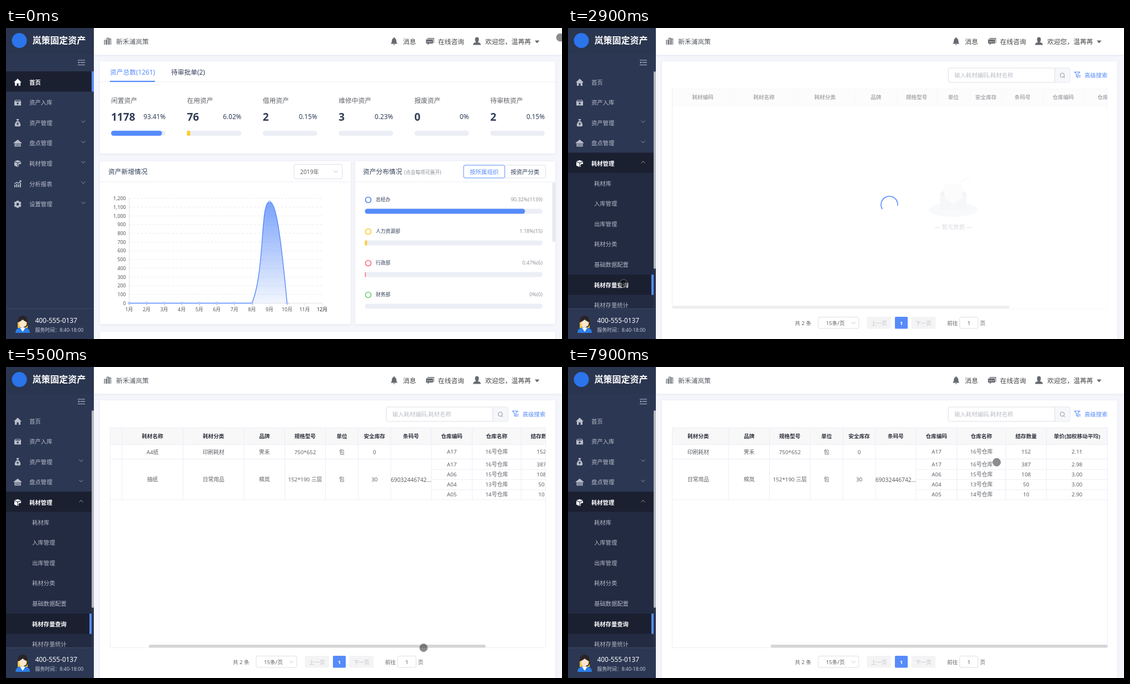
Animation, 1000 px wide and 560 px high, one loop 8000 ms. Source, as an HTML page:

```html
<!DOCTYPE html>
<html lang="zh-CN">
<head>
<meta charset="utf-8">
<title>固定资产</title>
<style>
html, body { margin: 0; width: 100%; height: 100%; overflow: hidden; background: #f5f6fb; }
svg { display: block; width: 1000px; height: 560px; }
text { font-family: "Noto Sans", "Noto Sans CJK SC", sans-serif; white-space: pre; }
</style>
</head>
<body>
<svg id="stage" viewBox="0 0 1000 560">
  <defs>
    <linearGradient id="area" x1="0" y1="0" x2="0" y2="1">
      <stop offset="0" stop-color="#5a8cfa" stop-opacity=".8"/>
      <stop offset="1" stop-color="#5a8cfa" stop-opacity=".08"/>
    </linearGradient>
    <filter id="soft" x="-5%" y="-10%" width="110%" height="125%">
      <feDropShadow dx="0" dy="1" stdDeviation="2" flood-color="#28395f" flood-opacity=".07"/>
    </filter>
    <clipPath id="tableBox"><rect x="187.5" y="109" width="783" height="397"/></clipPath>
    <clipPath id="menuBox"><rect y="78" width="158" height="427"/></clipPath>
  </defs>
  <g id="dash"></g>
  <g id="stock"></g>
  <g id="top"></g>
  <g id="side"></g>
  <circle id="cursor" r="7" fill="#000" fill-opacity=".45" stroke="#828282" stroke-opacity=".85"/>
</svg>
<script>
const LOOP = 8000, STEP = 100;
const BLUE = '#568bfa', YELLOW = '#fdcb2e', RED = '#fb6f7f', GREEN = '#72cd7c';
const INK = '#303d57', GREY = '#606266', PALE = '#ebeef5', EDGE = '#dcdfe6';
const NAVY = '#2c3753', DEEP = '#232b43', NIGHT = '#1b2031';
const $ = id => document.getElementById(id);

// y is the middle of the line of text
const text = (x, y, s, size, fill = INK, anchor = 'start', weight = 400) =>
  `<text x="${x}" y="${y + size * .37}" font-size="${size}" fill="${fill}" text-anchor="${anchor}" font-weight="${weight}">${s}</text>`;
const mid = (x, y, s, size, fill, weight) => text(x, y, s, size, fill, 'middle', weight);
const end = (x, y, s, size, fill, weight) => text(x, y, s, size, fill, 'end', weight);
const rect = (x, y, w, h, fill, r = 0, more = '') =>
  `<rect x="${x}" y="${y}" width="${w}" height="${h}" rx="${r}" fill="${fill}" ${more}/>`;
const box = (x, y, w, h, stroke = EDGE, fill = '#fff', r = 3) =>
  rect(x + .5, y + .5, w - 1, h - 1, fill, r, `stroke="${stroke}"`);
const card = (x, y, w, h) => rect(x, y, w, h, '#fff', 2, 'filter="url(#soft)"');
const line = (d, stroke, w = 1, more = '') => `<path d="${d}" fill="none" stroke="${stroke}" stroke-width="${w}" ${more}/>`;
const fill = (d, color) => `<path d="${d}" fill="${color}" fill-rule="evenodd"/>`;
const at = (x, y, s, turn = 0) => `<g transform="translate(${x} ${y}) rotate(${turn})">${s}</g>`;
const chevron = (x, y, color, turn = 0) => at(x, y, line('M-3.5-1.8 0 1.8 3.5-1.8', color), turn);
const bar = (x, y, w, part, color) => rect(x, y, w, 9, PALE, 4.5) +
  (part ? rect(x, y, part, 9, color, Math.min(4.5, part / 3)) : '');

// value at t along rows of [time, ...values]
function along(keys, t) {
  if (t <= keys[0][0]) return keys[0].slice(1);
  for (let i = 1; i < keys.length; i++) {
    const a = keys[i - 1], b = keys[i];
    if (t <= b[0]) {
      const k = (t - a[0]) / (b[0] - a[0]);
      return a.slice(1).map((v, j) => v + (b[j + 1] - v) * k);
    }
  }
  return keys[keys.length - 1].slice(1);
}

const pointer = [
  [0, 997, 17], [200, 559, 71], [300, 275, 125], [400, 8, 156], [500, 8, 164], [600, 20, 180],
  [1100, 80, 246], [1500, 82, 252], [1800, 92, 390], [2100, 94, 485], [2400, 100, 460],
  [3000, 100, 460], [3200, 170, 380], [3350, 330, 210], [3500, 530, 135], [3600, 782, 144],
  [3800, 842, 120], [4000, 849, 115], [4200, 849, 115], [4400, 874, 150], [4700, 708, 422],
  [4800, 668, 466], [4900, 655, 486], [5100, 683, 505], [5200, 683, 505], [5500, 751, 505.5],
  [5900, 792.5, 505.5], [6200, 845, 506], [6600, 860, 507], [6900, 860, 507], [7000, 857, 475],
  [7100, 864, 378], [7300, 917, 160], [7400, 880, 123], [7600, 712, 143], [7700, 696, 152],
  [7800, 733, 158], [7900, 771, 171.5]
];
const scroll = [[5200, 0], [5500, 89], [5900, 161], [6100, 220], [6200, 228]];
const unfold = [[1200, 0], [1300, .12], [1400, .55], [1500, .87], [1600, 1]];

function dashboard() {
  let s = card(169, 60, 819, 166) + card(169, 240, 451, 293) + card(628, 240, 360, 293) + card(169, 547, 819, 30);
  s += text(187, 79.5, '资产总数(1261)', 11.75, BLUE) + text(297, 79.5, '待审批单(2)', 11.75);
  s += line('M169 97H988M169 277H620M628 277H988', PALE) + rect(187, 95, 81, 2.2, BLUE);

  const stats = [['闲置资产', 1178, '93.41%', 91.5, BLUE], ['在用资产', 76, '6.02%', 6, YELLOW], ['借用资产', 2, '0.15%'],
    ['维修中资产', 3, '0.23%'], ['报废资产', 0, '0%'], ['待审核资产', 2, '0.15%']];
  stats.forEach(([name, n, pct, part, color], i) => {
    const x = 189 + 136.4 * i;
    s += text(x, 130.5, name, 11.75, GREY) + text(x, 159.5, n, 19, INK, 'start', 700) +
      end(x + 98, 159.5, pct, 11.75, INK) + bar(x, 185, 98, part, color);
  });

  s += text(184, 259, '资产新增情况', 11.75) + box(517.5, 245, 88, 27) +
    text(529, 259, '2019年', 10.3, GREY) + chevron(593, 258.5, '#b8bcc6');
  for (let i = 0; i <= 12; i++) {
    const y = 495.5 - 15.72 * i;
    s += end(215.5, y, (i * 100).toLocaleString('en-US'), 8.8, '#555');
    if (i) s += line(`M221.5 ${y}H569`, '#e6e6e8', .8, 'stroke-dasharray="4 3"');
  }
  const mx = i => 221.3 + 31.58 * i;
  s += line('M221.5 307V495.5H569', '#dfe2e8');
  for (let i = 0; i < 12; i++)
    s += line(`M${mx(i)} 495.5v4`, '#d5d8de', .8) + mid(mx(i), 507, i + 1 + '月', 8.8, i == 11 ? '#222' : '#555');
  const hill = 'C466 437 457 313 474 313C484 313 492 350 505.5 495.5';
  s += fill(`M442.4 495.5${hill}Z`, 'url(#area)') + line(`M221.3 495.5H442.4${hill}`, BLUE, 1.4);
  for (let i = 0; i < 10; i++)
    s += `<circle cx="${mx(i)}" cy="${i == 8 ? 313 : 495.5}" r="1.6" fill="#fff" stroke="${BLUE}"/>`;

  s += text(642, 259, '资产分布情况', 11.75) + text(716, 260, '(点击每项可展开)', 8.8, '#8a8d94');
  s += box(896, 246.5, 75, 24) + box(822.5, 246.5, 75, 24, BLUE);
  s += mid(860, 259, '按所属组织', 10.3, BLUE) + mid(933.5, 259, '按资产分类', 10.3, INK);
  s += rect(982.5, 278, 5.5, 107, '#e6e8ed', 2);
  [['总经办', '90.32%(1139)', 288, BLUE], ['人力资源部', '1.18%(15)', 3.8, YELLOW],
    ['行政部', '0.47%(6)', 1.6, RED], ['财务部', '0%(0)', 0, GREEN]].forEach(([name, pct, part, color], i) => {
    const y = 309.5 + 57 * i;
    s += `<circle cx="651.5" cy="${y}" r="5" fill="#fff" stroke="${color}" stroke-width="1.7"/>` +
      text(665, y - .5, name, 8.8) + end(965, y - .5, pct, 9.1, '#8f9299') + bar(645.5, y + 16, 319.5, part, color);
  });
  return s;
}

const cols = [187.5, 297.5, 407.5, 517, 590.5, 663.5, 722.5, 781, 854, 927.5, 1015.5, 1088.5, 1198.5];
const heads = ['耗材编码', '耗材名称', '耗材分类', '品牌', '规格型号', '单位', '安全库存', '条码号', '仓库编码', '仓库名称', '结存数量', '单价(加权移动平均)'];
const goods = [['4HBE6M8CSJ', 'A4纸', '印刷耗材', '霁禾', '750*652', '包', '0', ''],
  ['W1FFBVKQF4', '抽纸', '日常用品', '棉岚', '152*190 三层', '包', '30', '69032446742...']];
const lots = [['A17', '16号仓库', '152', '2.11'], ['A17', '16号仓库', '387', '2.98'], ['A06', '15号仓库', '108', '3.00'],
  ['A04', '13号仓库', '50', '3.00'], ['A05', '14号仓库', '10', '2.90']];
const center = i => (cols[i] + cols[i + 1]) / 2;

function emptyNote() {
  return at(693, 310, '<ellipse cy="17" rx="44" ry="13" fill="#eef0f4"/>' +
    fill('M-24-12 0-28 24-12V17H-24Z', '#dfe3ea') + fill('M-16-30H16V0L0 10-16 0Z', '#f8f9fb') +
    fill('M-24-12 0 8 24-12V17H-24Z', '#e8ebf0') + line('M14-32Q22-44 30-38', '#dfe3ea')) +
    mid(693, 358, '— 暂无数据 —', 10.3, '#a5a9b2');
}

function stockPage(t) {
  const loaded = t >= 3300, shift = along(scroll, t)[0], rowEnd = loaded ? 239 : 139;
  let s = card(169, 60, 819, 520);
  s += box(683.5, 71.5, 220, 27) + rect(876, 72.5, 26.5, 25, '#f5f7fa') + line('M875.5 72V98', EDGE);
  s += text(695, 85, '输入耗材编码,耗材名称', 10.3, '#b9bdc7');
  s += '<circle cx="889" cy="85" r="3.8" fill="none" stroke="#909399"/>' + line('M891.6 87.8 893.6 90', '#909399');
  s += line('M911 79.2H920.5L917 83.5V89L914.4 87.5V83.5ZM918.5 85.5H922M918.5 88H922', BLUE, 1.1) +
    text(929, 85, '高级搜索', 10.3, BLUE);

  let body = rect(187.5, 109, 1011, 30, '#f8f8f9') + line('M187 109.5H1199M187 139.5H1199', PALE);
  heads.forEach((h, i) => { body += mid(center(i), 124.5, h, 9.65, '#30343c', 700); });
  body += line(cols.slice(1).map(x => `M${x} 109V${rowEnd}`).join(''), PALE);
  if (loaded) {
    body += line('M187 165.5H1199M187 239H1199M854 184.3H1199M854 202.5H1199M854 220.8H1199', PALE);
    goods.forEach((row, r) => row.forEach((v, i) => {
      body += mid(center(i), r ? 202.7 : 153, v, i % 7 ? 9.8 : 10.3, i ? GREY : BLUE);
    }));
    lots.forEach((row, r) => row.forEach((v, i) => {
      body += mid(center(i + 8), r ? 156.8 + 18.25 * r : 152.5, v, 9.8, GREY);
    }));
  } else body += emptyNote();
  s += `<g clip-path="url(#tableBox)"><g transform="translate(${-shift})">${body}</g></g>`;
  s += line('M187.5 109V505.5H970.5V109', PALE) + rect(188 + shift * 606 / 783, 500, 606, 5.2, '#d6d6d7', 2.6);

  if (!loaded) s += rect(188, 109, 783, 397, '#fff', 0, 'opacity=".6"') +
    at(578, 318, `<circle r="15" fill="none" stroke="${BLUE}" stroke-width="1.6" stroke-dasharray="56 39" stroke-linecap="round"/>`, t * .3);

  s += text(408, 531, '共 2 条', 9.6, GREY) + box(449.5, 520, 74, 21.5) + text(464, 531, '15条/页', 9.6, GREY) + chevron(513.5, 531, '#c0c4cc');
  s += rect(537.5, 520, 43.5, 21.5, '#f4f4f5', 1.5) + mid(559.3, 531, '上一页', 9.6, '#c0c4cc');
  s += rect(588, 520, 23, 21.5, BLUE, 1.5) + mid(599.5, 531, '1', 9.6, '#fff', 700);
  s += rect(617.5, 520, 43.5, 21.5, '#f4f4f5', 1.5) + mid(639.3, 531, '下一页', 9.6, '#c0c4cc');
  s += text(682, 531, '前往', 9.6, GREY) + box(704, 520, 34, 21.5) + mid(721, 531, '1', 9.6, GREY) + text(741, 531, '页', 9.6, GREY);
  return s;
}

function topBar() {
  const c = '#666a70';
  return rect(158, 0, 842, 48, '#fff', 0, 'filter="url(#soft)"') +
    at(183, 24, line('M-6 6V-2H-2.5V6M-1.5 6V-6H2V6M3 6V-4.5H5.5V6', c, 1.2) + line('M-4.2-1V6M.3-5V6', c, .7)) +
    text(198, 24.5, '新禾浦岚策', 11.75, '#51565e') +
    at(698, 24, fill('M-6 4.5Q-4 3-4-1Q-4-5-1-5.5V-7H1V-5.5Q4-5 4-1Q4 3 6 4.5ZM-2 5.5H2Q0 8-2 5.5Z', c)) +
    text(714, 24.5, '消息', 11.75, '#444') +
    at(763, 24, fill('M-5-6H7V3H6V-4.5H-5ZM-7.5-3.5H5V4H-2L-4.5 7V4H-7.5ZM-5 0v1.5h1.5V0ZM-2 0v1.5h1.5V0ZM1 0v1.5h1.5V0Z', c)) +
    text(777, 24.5, '在线咨询', 11.75, '#444') +
    at(847, 24, fill('M-3.5-3.5A3.5 4 0 0 1 3.5-3.5Q3.5 0 1.5 1.5Q7 2.5 7 6.5H-7Q-7 2.5-1.5 1.5Q-3.5 0-3.5-3.5Z', c)) +
    text(862, 24.5, '欢迎您，温苒苒', 11.75, '#444') + fill('M951 22.5H959.5L955.2 27.5Z', c);
}

const icons = [
  'M-7 .3 0-6.5 7 .3H5V6.3H1.6V2h-3.2V6.3H-5V.3Z',
  'M-4-5H4L6-2.5V5H-6V-2.5ZM-4.5-2.2H4.5L3.4-3.8H-3.4ZM-.7-.5V.8H-2V2H-.7V3.3H.7V2H2V.8H.7V-.5Z',
  'M-2.5-7H2.5L1.2-4H-1.2ZM-1.5-3.3H1.5C5-1 7 6.3 3 6.3H-3C-7 6.3-5-1-1.5-3.3ZM-2-.8-.6 1.2H-2V2.2H-.5V4.5H.5V2.2H2V1.2H.6L2-.8H1L0 .7-1-.8Z',
  'M-7-1 0-6.5 7-1V.2H-7ZM-5.5 1H5.5V6H-5.5ZM-3.5 2V5H-2.2V2ZM-.7 2V5H.7V2ZM2.2 2V5H3.5V2Z',
  'M-6-4 0-6.3 6-4 0-1.7ZM-6-3V3.5L-.5 6V-.8ZM6-3 .5-.8V6L2 5.3A3 3 0 0 1 6 1Z',
  'M-6 2H-4V6H-6ZM-2.7 0H-.7V6H-2.7ZM.7 1H2.7V6H.7ZM4-2H6V6H4ZM-6.5 0-2-4 1-2 4.5-5H3V-6.2H6.5V-3H5.4V-4L1-.2-2-2.3-6 1Z',
  'M-2-6.3H2L2.6-4.4 5-5 6.5-1.8 5 0 6.5 2 5 5 2.6 4.4 2 6.3H-2L-2.6 4.4-5 5-6.5 2-5 0-6.5-1.8-5-5-2.6-4.4ZM0-2.3A2.3 2.3 0 1 0 0 2.3 2.3 2.3 0 1 0 0-2.3Z'
];
const menu = ['首页', '资产入库', '资产管理', '盘点管理', '耗材管理', '分析报表', '设置管理'];
const submenu = ['耗材库', '入库管理', '出库管理', '耗材分类', '基础数据配置', '耗材存量查询', '耗材存量统计'];
const ROW = 36.6, TOP = 78, VIEW = 427, FULL = ROW * 7;

// y is the top edge of the row
function menuItem(i, y, right, active, dark, turn) {
  const c = active ? '#fff' : '#b9bfcb', cy = y + 19.8;
  return (dark ? rect(0, y, right, ROW, NIGHT) : '') + at(21, cy, fill(icons[i], c)) +
    text(42, cy, menu[i], 10.3, c, 'start', active ? 700 : 400) +
    (i > 1 ? chevron(right - 19, cy - 2.5, '#9098aa', turn) : '');
}

function agent() {
  return at(30, 534,
    fill('M-9-6Q-8-14 0-14Q8-14 9-6L9 6H-9Z', '#f2c244') +
    fill('M-13 15Q-13 7-4 5H4Q13 7 13 15Z', '#2b7ee8') + fill('M-5 5.5H5L0 13Z', '#fff') +
    '<ellipse cy="-2" rx="6.3" ry="7.8" fill="#fbe6d0"/>' +
    fill('M-9-4C-11-20 11-20 9-4L6-5Q2-7 0-9Q-2-7-6-5Z', '#2a2427') +
    line('M8.5-4Q9 4 2.5 4.5', '#2a2427', 1.6));
}

function sidebar(t) {
  const open = along(unfold, t)[0], h = FULL * open, onStock = t >= 2800;
  const total = FULL + h, over = total > VIEW, right = over ? 154 : 158;
  let s = rect(0, 0, 158, 560, NAVY) + rect(0, 0, 158, 48, '#2a354f');
  s += '<circle cx="24" cy="22.5" r="13.5" fill="#2b74ea"/>' + text(47.5, 22.5, '岚策固定资产', 16, '#fff', 'start', 700);
  s += line('M129 58H142M133.5 62.2H142M129 66.5H142', '#b5bccb', 1.2) + fill('M129 62.2 131.8 60.3V64.1Z', '#b5bccb');

  let m = '';
  if (h) {
    const top = TOP + ROW * 5;
    m += rect(0, top, right, h, DEEP);
    submenu.forEach((name, i) => {
      const y = top + ROW * i, on = onStock && i == 5;
      if (on) m += rect(0, y, right, ROW, NIGHT) + rect(right - 4, y, 4, ROW, BLUE);
      m += text(47, y + 18.8, name, 10.3, on ? '#fff' : '#b3b9c6', 'start', on ? 700 : 400);
    });
    m += rect(0, top + h, right, 300, NAVY);
  }
  menu.forEach((name, i) => {
    const active = i == (onStock ? 4 : 0), parent = i == 4;
    m += menuItem(i, TOP + ROW * i + (i > 4 ? h : 0), right, active, active || (parent && open > 0), parent ? 180 * open : 0);
  });
  if (!onStock) m += rect(right - 4, TOP, 4, ROW, BLUE);
  if (over) m += rect(154, TOP, 4, VIEW, '#2a334a') + rect(154, TOP, 4, VIEW * VIEW / total, '#b3b6bd', 2);
  s += `<g clip-path="url(#menuBox)">${m}</g>`;

  s += rect(0, 505, 158, 55, NAVY) + line('M0 505.5H158', '#3b4763') + agent();
  s += text(52.5, 526.5, '400-555-0137', 11.9, '#fff', 'start', 500) + text(52.5, 544, '服务时间：8:40-18:00', 8.8, '#c3c9d5');
  return s;
}

$('dash').innerHTML = dashboard();
$('top').innerHTML = topBar();

let shown = -1;
function draw(t) {
  if (t === shown) return;
  shown = t;
  const onStock = t >= 2900;
  $('dash').style.display = onStock ? 'none' : '';
  $('stock').innerHTML = onStock ? stockPage(t) : '';
  $('side').innerHTML = sidebar(t);
  const [x, y] = along(pointer, t);
  $('cursor').setAttribute('cx', x);
  $('cursor').setAttribute('cy', y);
}

const start = performance.now();
function tick() {
  const t = (performance.now() - start) % LOOP;
  draw(Math.floor(t / STEP) * STEP);
  requestAnimationFrame(tick);
}
tick();
</script>
</body>
</html>
```
